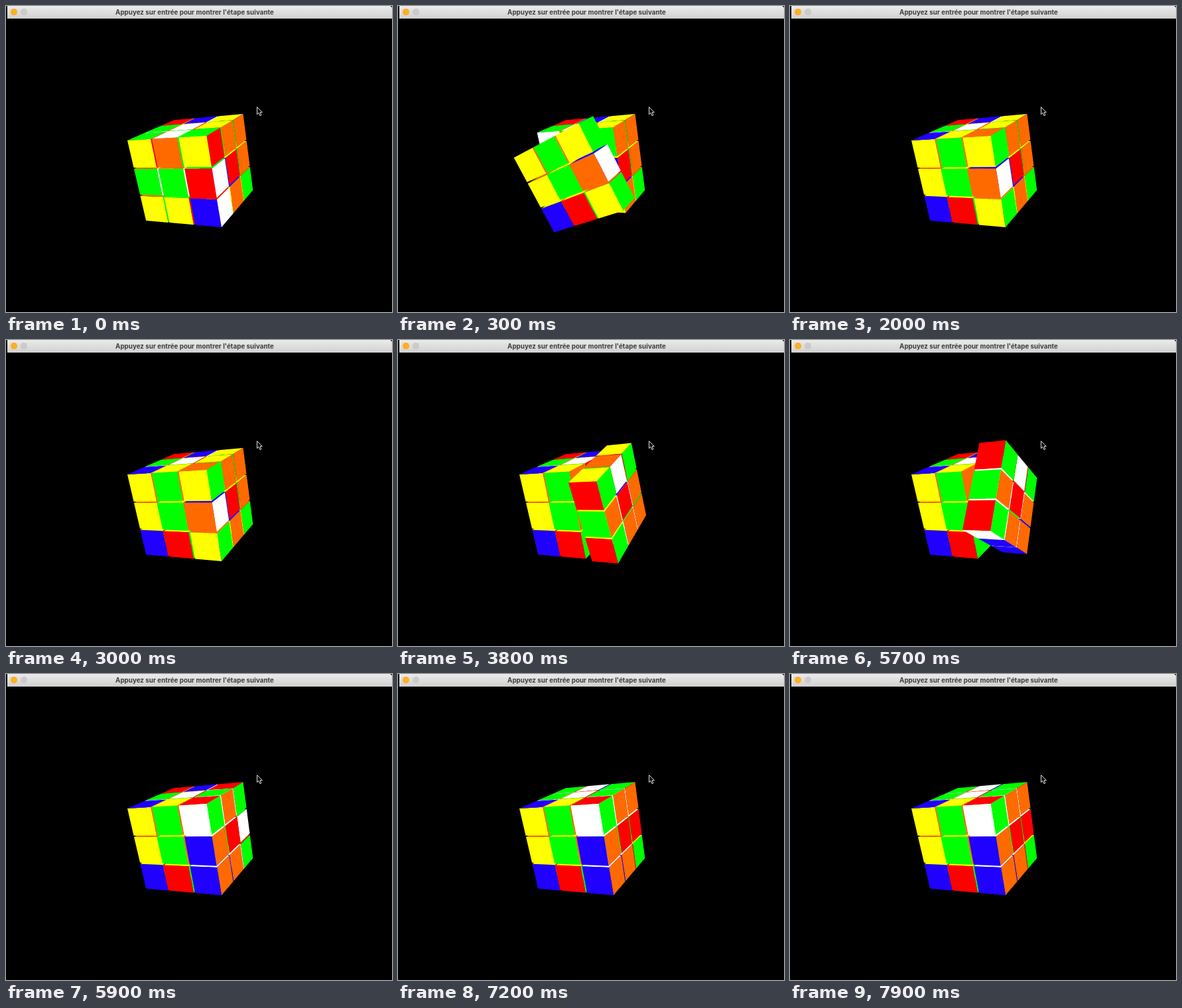
Recreate the animation shown at these times as an HTML page with a canvas. Size 582 by 462 pixels, loop 8000 ms.

```html
<!DOCTYPE html>
<html lang="fr">
<head>
<meta charset="utf-8">
<title>Cube</title>
<style>
  html, body { margin: 0; width: 100%; height: 100%; overflow: hidden; background: #000; }
  #stage { position: relative; width: 582px; height: 462px; background: #000; overflow: hidden; }
  #bar {
    position: absolute; left: 2px; top: 0; width: 580px; height: 19px;
    background: linear-gradient(#ebebeb, #d0d0d0); border-top-right-radius: 4px;
  }
  #bar i { position: absolute; top: 4.4px; width: 9.2px; height: 9.2px; border-radius: 50%; }
  #bar .min { left: 5.4px; background: #fdaf24; }
  #bar .max { left: 20.4px; background: #cbcbcb; }
  #bar b {
    position: absolute; left: 0; width: 565px; top: 0; text-align: center; white-space: nowrap;
    font: 700 9.85px/18px Inter, "Open Sans", sans-serif; color: #3d3d3d;
  }
  canvas, svg { position: absolute; left: 0; top: 0; }
</style>
</head>
<body>
<div id="stage">
  <canvas id="view" width="582" height="462"></canvas>
  <div id="bar"><i class="min"></i><i class="max"></i><b>Appuyez sur entrée pour montrer l'étape suivante</b></div>
  <svg width="582" height="462">
    <path d="M378.6 152.6v11l2.5-2.3 1.9 4.3 1.9-.8-1.8-4.2h3.2z" fill="#000" stroke="#e6e6e6" stroke-width="1"/>
  </svg>
</div>
<script>
const LOOP = 8000, STEP = 100;
const HALF = 0.4835, PITCH = 1.0165;

const PAINT = { r: '#ff0000', o: '#ff6a00', w: '#ffffff', y: '#ffff00', g: '#00ff00', b: '#2000ff' };
const DIRS = { R: [1, 0, 0], L: [-1, 0, 0], U: [0, 1, 0], D: [0, -1, 0], F: [0, 0, 1], B: [0, 0, -1] };
const HUES = { r: DIRS.R, o: DIRS.L, w: DIRS.U, y: DIRS.D, g: DIRS.F, b: DIRS.B };

// Two known stickers fix the orientation of a piece
const PIECES = {
  UFL: 'UgFy', UF: 'UwFo', UFR: 'UgFy', FL: 'FgLy', F: 'FgRw', FR: 'FrRw',
  DFL: 'FyLb', DF: 'FyLo', DFR: 'FbRw', UL: 'UgFw', U: 'UwFg', UR: 'UyRo',
  R: 'RrUy', BR: 'RoUy', DR: 'RoDg', DBR: 'RgDr', UBR: 'UyRo',
  UB: 'UbFo', UBL: 'UrFg', DB: 'DrRw', DBL: 'DgFr'
};

// Clockwise quarter turns: start time and the angle in each step
const MOVES = [
  { face: 'F', at: 100, angles: [10, 30, 70, 90] },
  { face: 'R', at: 3600, angles: [10, 40, 80, 90] },
  { face: 'R', at: 5700, angles: [40, 80, 90] },
  { face: 'B', at: 6600, angles: [10, 40, 80, 90] }
];

// Homogeneous projection: centre and one column per axis
const CENTRE = [351.925, 300.9, 1.237];
const AXES = [[30.8, -12.33, -0.0493], [-16.82, -55.57, -0.0287], [-46.93, -2.03, -0.08]];
const EYE = [6.27, 3.645, 10.29];

const ctx = document.getElementById('view').getContext('2d');

const dot = (a, b) => a[0] * b[0] + a[1] * b[1] + a[2] * b[2];
const add = (a, b, s = 1) => a.map((v, i) => v + b[i] * s);
const cross = (a, b) => [
  a[1] * b[2] - a[2] * b[1],
  a[2] * b[0] - a[0] * b[2],
  a[0] * b[1] - a[1] * b[0]
];
const hueOf = v => Object.keys(HUES).find(k => dot(HUES[k], v) === 1);

function turn(v, n, deg) {
  const a = -deg * Math.PI / 180, c = Math.cos(a), s = Math.sin(a);
  const along = dot(n, v) * (1 - c), side = cross(n, v);
  const out = v.map((x, i) => x * c + side[i] * s + n[i] * along);
  return deg === 90 ? out.map(Math.round) : out;
}

function project(p) {
  const h = AXES.reduce((sum, axis, i) => add(sum, axis, p[i]), CENTRE);
  return [h[0] / h[2], h[1] / h[2]];
}

function makePiece(x, y, z) {
  const name = ['D', '', 'U'][y + 1] + ['B', '', 'F'][z + 1] + ['L', '', 'R'][x + 1];
  const [f1, c1, f2, c2] = PIECES[name] || 'UwFg';
  const d = [DIRS[f1], DIRS[f2]], h = [HUES[c1], HUES[c2]];
  d.push(cross(d[0], d[1]));
  h.push(cross(h[0], h[1]));
  return {
    pos: [x, y, z],
    dirs: d,
    hues: h.map(v => [hueOf(v), hueOf(v.map(n => -n))])
  };
}

const pieces = [];
for (const x of [-1, 0, 1])
  for (const y of [-1, 0, 1])
    for (const z of [-1, 0, 1]) pieces.push(makePiece(x, y, z));

function pose(piece, t) {
  let { pos, dirs } = piece, layer = pos[2];
  for (const { face, at, angles } of MOVES) {
    if (t < at) break;
    const n = DIRS[face];
    const deg = angles[Math.min(angles.length - 1, Math.floor((t - at) / STEP))];
    const depth = dot(pos, n);
    layer = depth * (n[0] + n[1] + n[2]);
    if (depth === 1) {
      pos = turn(pos, n, deg);
      dirs = dirs.map(d => turn(d, n, deg));
    }
  }
  const mid = pos.map(v => v * PITCH);
  const ray = add(EYE, mid, -1);
  return { mid, dirs, layer, hues: piece.hues, dist: dot(ray, ray) };
}

function drawPiece({ mid, dirs, hues }) {
  dirs.forEach((dir, a) => {
    const u = dirs[(a + 1) % 3], v = dirs[(a + 2) % 3];
    [1, -1].forEach((sign, side) => {
      const c = add(mid, dir, sign * HALF);
      if (sign * dot(dir, add(EYE, c, -1)) <= 0) return;
      ctx.fillStyle = PAINT[hues[a][side]];
      ctx.beginPath();
      for (const [p, q] of [[1, 1], [1, -1], [-1, -1], [-1, 1]])
        ctx.lineTo(...project(add(add(c, u, p * HALF), v, q * HALF)));
      ctx.fill();
    });
  });
}

function draw(t) {
  ctx.fillStyle = '#000';
  ctx.fillRect(0, 0, 582, 462);
  pieces.map(p => pose(p, t))
    .sort((a, b) => a.layer - b.layer || b.dist - a.dist)
    .forEach(drawPiece);
}

const start = performance.now();
function tick() {
  const t = (performance.now() - start) % LOOP;
  draw(Math.floor(t / STEP) * STEP);
  requestAnimationFrame(tick);
}
tick();
</script>
</body>
</html>
```
